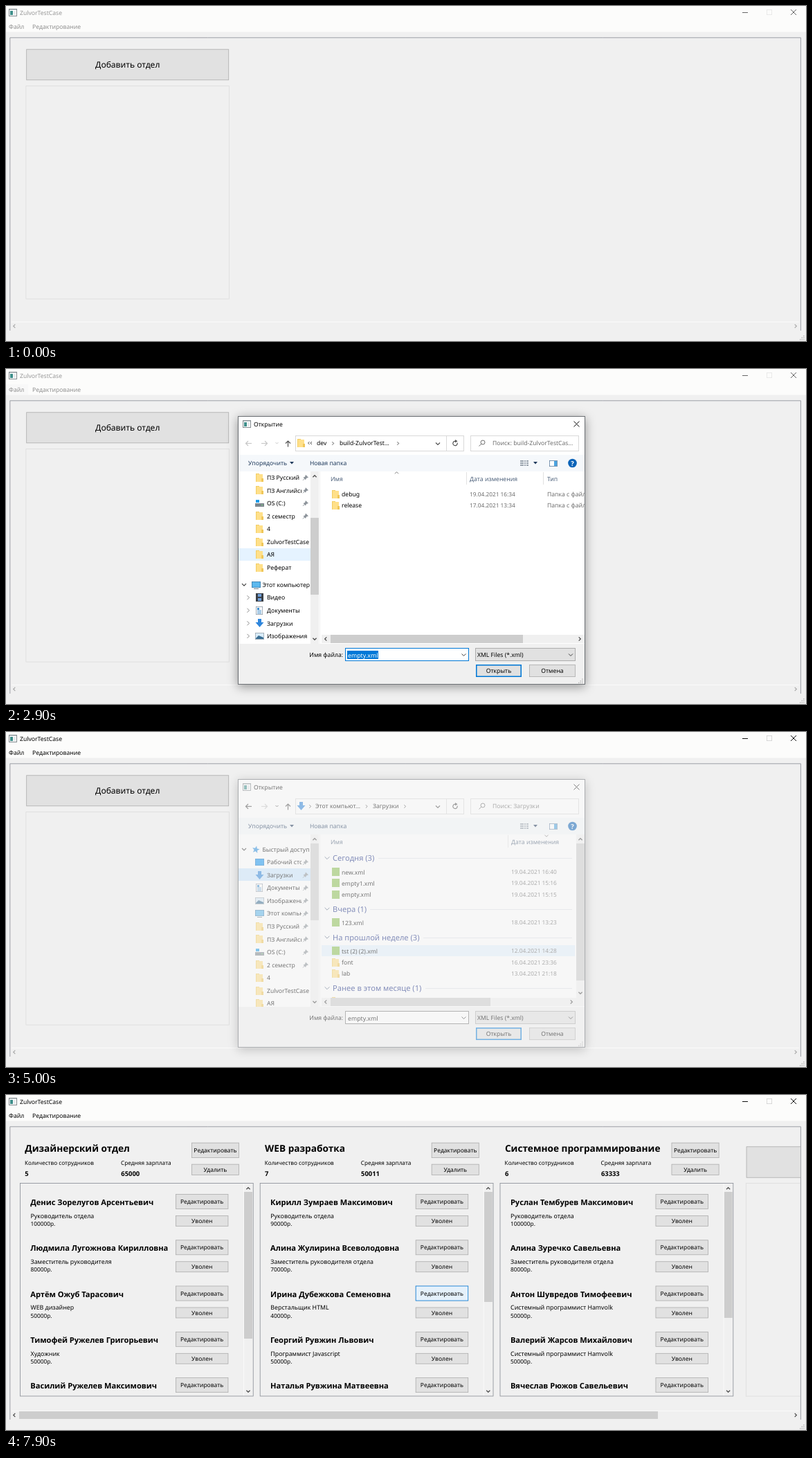
Recreate the animation shown at these times as an HTML page with a canvas. Size 1156 by 484 pixels, loop 8000 ms.

```html
<!DOCTYPE html>
<html lang="ru">
<head>
<meta charset="utf-8">
<title>ZulvorTestCase</title>
<style>
html, body { margin: 0; width: 100%; height: 100%; overflow: hidden; background: #f0f0f0; }
canvas { position: absolute; left: 0; top: 0; }
#dialog { transform-origin: 586px 262px; }
</style>
</head>
<body>
<canvas id="main" width="1156" height="484"></canvas>
<canvas id="dialog" width="1156" height="484"></canvas>
<script>
const LOOP = 8000, STEP = 100;
// The interface is shown scaled down: one of its pixels covers this much of the stage.
const PX = 1156 / 1500;
const BLUE = '#0078d7', HOVER = '#e5f3ff', SELECTED = '#cce8ff', FACE = '#f0f0f0', THUMB = '#cdcdcd';
const APP = 'ZulvorTestCase';
const dialogCanvas = document.getElementById('dialog');
const mainCtx = document.getElementById('main').getContext('2d');
const dialogCtx = dialogCanvas.getContext('2d');
let g = mainCtx, t = 0;

const during = (from, to) => t >= from && t < to;
const ramp = (start, steps) => Math.min(1, Math.max(0, ((t - start) / STEP + 1) / steps));

// ---- drawing helpers ----
function fill(x, y, w, h, color) {
  g.fillStyle = color;
  g.fillRect(x, y, w, h);
}
function box(x, y, w, h, face, edge, width = PX) {
  if (face) fill(x, y, w, h, face);
  g.strokeStyle = edge;
  g.lineWidth = width;
  g.strokeRect(x + width / 2, y + width / 2, w - width, h - width);
}
function line(points, color, width = 1) {
  g.strokeStyle = color;
  g.lineWidth = width;
  g.beginPath();
  points.forEach(([x, y]) => g.lineTo(x, y));
  g.stroke();
}
function shape(points, color) {
  g.fillStyle = color;
  g.beginPath();
  points.forEach(([x, y]) => g.lineTo(x, y));
  g.fill();
}
function text(str, x, y, size = 8.6, color = '#000', weight = 400, align = 'left') {
  g.font = `${weight} ${size}px "Noto Sans", "Open Sans", sans-serif`;
  g.textAlign = align;
  g.fillStyle = color;
  g.fillText(str, x, y);
}
function clipped(x, y, w, h, draw) {
  g.save();
  g.beginPath();
  g.rect(x, y, w, h);
  g.clip();
  draw();
  g.restore();
}
const RIGHT = 0, DOWN = 1, LEFT = 2, UP = 3;
function turned(x, y, dir, draw) {
  g.save();
  g.translate(x, y);
  g.rotate(dir * Math.PI / 2);
  draw();
  g.restore();
}
function chevron(x, y, dir, r = 2.6, color = '#505050', width = 1.3) {
  turned(x, y, dir, () => line([[-r / 2, -r], [r / 2, 0], [-r / 2, r]], color, width));
}
function arrow(x, y, dir, color) {
  turned(x, y, dir, () => {
    line([[-4.5, 0], [4, 0]], color, 1.2);
    line([[.5, -3.5], [4, 0], [.5, 3.5]], color, 1.2);
  });
}
function cross(x, y, color) {
  line([[x - 4, y - 4], [x + 4, y + 4]], color);
  line([[x + 4, y - 4], [x - 4, y + 4]], color);
}
function button(label, x, y, w, h, hover = 0, size = 8.45) {
  box(x, y, w, h, '#e1e1e1', '#adadad');
  g.globalAlpha = hover;
  box(x, y, w, h, '#e5f1fb', BLUE);
  g.globalAlpha = 1;
  text(label, x + w / 2, y + h / 2 + size * .36, size, '#000', 400, 'center');
}
function grip(x, y) {
  for (let r = 0; r < 3; r++)
    for (let c = 2 - r; c < 3; c++) fill(x + c * 2.6, y + r * 2.6, 1.4, 1.4, '#b4b4b4');
}
function vScroll(x, top, bottom, thumbY, thumbH) {
  fill(x, top, 12, bottom - top, FACE);
  fill(x, thumbY, 12, thumbH, THUMB);
  chevron(x + 6, top + 7, UP);
  chevron(x + 6, bottom - 7, DOWN);
}
function hScroll(left, right, y, thumbX, thumbW) {
  fill(left, y, right - left, 12, FACE);
  fill(thumbX, y, thumbW, 12, THUMB);
  chevron(left + 6, y + 6, LEFT);
  chevron(right - 7, y + 6, RIGHT);
}
function appIcon(x, y) {
  box(x, y, 12, 11, '#fff', '#858d91', 1);
  fill(x + 1, y + 1, 10, 1, '#c9d2d6');
  fill(x + 2, y + 3, 4, 6, '#3f8f8b');
  fill(x + 7, y + 3, 3, 6, '#e6eaec');
}

// Icons are about 12 px wide and centred on x, y.
const icons = {
  folder(x, y) {
    fill(x - 5, y - 6, 5, 12, '#f3cd63');
    fill(x - 4, y - 5, 9, 11, '#ffe08a');
    fill(x + 3, y + 1, 3, 5, '#f0c75a');
  },
  xml(x, y) { fill(x - 5, y - 6, 11, 12, '#8cc152'); },
  desktop(x, y) { box(x - 6, y - 5, 13, 10, '#1296f3', '#0b6fc2'); },
  download(x, y) {
    fill(x - 2, y - 6, 5, 6, '#2f86dc');
    shape([[x - 5.5, y - 1], [x + 6.5, y - 1], [x + .5, y + 6]], '#2f86dc');
  },
  document(x, y) {
    box(x - 5, y - 6, 10, 12, '#fff', '#8b97a3');
    fill(x - 3, y - 4, 3, 3, '#3f8fd0');
    for (let i = 0; i < 3; i++) fill(x - 3, y + i * 2 - .5, 6, 1, '#5b9bd0');
  },
  picture(x, y) {
    box(x - 6, y - 5, 13, 10, '#d9ecf9', '#9aa4ab');
    shape([[x - 5, y + 3], [x - 1, y - 1], [x + 6, y + 2], [x + 6, y + 4], [x - 5, y + 4]], '#3a6f94');
  },
  pc(x, y) {
    box(x - 6, y - 5, 13, 9, '#5cb8ee', '#3d7ba8');
    fill(x - 3, y + 5, 7, 1, '#6f7f8a');
  },
  drive(x, y) {
    fill(x - 5, y - 5, 5, 4, '#1c9be8');
    fill(x - 6, y, 13, 5, '#7d878e');
    fill(x + 3, y + 2, 2, 1, '#7fe07f');
  },
  star(x, y) {
    const points = Array.from({ length: 10 }, (_, i) => {
      const a = i * Math.PI / 5 - Math.PI / 2 + .2, r = i % 2 ? 2.4 : 5.6;
      return [x + r * Math.cos(a), y + r * Math.sin(a)];
    });
    shape(points, '#2b8fdf');
  },
  film(x, y) {
    fill(x - 5, y - 6, 11, 12, '#3a3f46');
    fill(x - 2, y - 5, 5, 4, '#6f9fd8');
    fill(x - 2, y + 1, 5, 4, '#6f9fd8');
  },
  music(x, y) {
    fill(x, y - 5, 1.5, 9, '#2f86dc');
    fill(x - 3, y + 2, 4, 3, '#2f86dc');
  }
};
function pin(x, y) {
  shape([[x, y - 4], [x + 4, y], [x + 1, y + 1], [x, y + 3.5], [x - 3.5, y], [x - 1, y - 1]], '#8c939a');
  line([[x - 1.5, y + 1.5], [x - 4, y + 4]], '#8c939a');
}

// ---- main window ----
const COLUMN = 450 * PX, ROW = 86 * PX;

function drawWindow() {
  const active = during(1200, 2100) || t >= 5000;
  const menuColor = during(1200, 2300) || t >= 5000 ? '#000' : '#8f8f8f';
  const buttonColor = active ? '#111' : '#666';
  fill(0, 0, 1156, 484, FACE);
  fill(0, 0, 1156, 37.4, '#fcfcfb');
  appIcon(4, 4);
  text(APP, 20, 13, 8.6, active ? '#000' : '#979797');
  line([[1064, 9.5], [1072, 9.5]], buttonColor);
  box(1099, 5, 8, 8, null, active ? '#cfcfcf' : '#e6e6e6');
  cross(1138, 9, buttonColor);

  if (during(800, 1200)) {
    g.globalAlpha = ramp(800, 2);
    box(0, 22, 32, 15, HOVER, SELECTED);
    g.globalAlpha = 1;
  } else if (during(1200, 2300)) box(0, 22, 32, 15, SELECTED, '#99d1ff');
  else if (during(2300, 5000)) fill(0, 22, 32, 15, '#f8f8f8');
  text('Файл', 4, 33, 8.6, menuColor);
  text('Редактирование', 38, 33, 8.6, menuColor);

  line([[5.8, 469], [5.8, 45.8], [1148.4, 45.8], [1148.4, 469]], '#828790', PX);
  const loaded = t >= 5100;
  fill(8, 456, 1138, 1, '#fafafa');
  if (loaded) fill(19, 457, 923, 11, THUMB);
  const arrowColor = loaded ? '#505050' : '#adadad';
  chevron(12, 462.5, LEFT, 2.6, arrowColor);
  chevron(1141, 462.5, RIGHT, 2.6, arrowColor);
  grip(1147, 476);
  if (loaded) clipped(6, 46, 1142, 410, drawDepartments);
  else {
    button('Добавить отдел', 29.3, 62.4, 292.8, 44.8, ramp(400, 3) - ramp(800, 3), 12);
    box(28.5, 115.2, 294.4, 308.3, null, '#dcdcdc');
  }
  if (during(1200, 2100)) drawMenu();
}

function drawMenu() {
  g.save();
  g.globalAlpha = ramp(1200, 3);
  g.shadowColor = 'rgba(0,0,0,.3)';
  g.shadowBlur = 4;
  g.shadowOffsetX = g.shadowOffsetY = 2;
  fill(0, 38, 95, 54, '#f2f2f2');
  g.shadowColor = 'transparent';
  box(0, 38, 95, 54, null, '#bdbdbd');
  if (t >= 1500) fill(2, t < 1800 ? 39 : 56, 91, 17, '#90c8f6');
  ['Создать', 'Открыть', 'Сохранить'].forEach((label, i) => text(label, 24, 51 + i * 17));
  g.restore();
}

const HEAD = 'Руководитель отдела', DEPUTY = 'Заместитель руководителя';
const SYSTEM = 'Системный программист Hamvolk';
const departments = [
  { title: 'Дизайнерский отдел', count: 5, mean: 65000, thumb: 212, staff: [
    ['Денис Зорелугов Арсентьевич', HEAD, 100000],
    ['Людмила Лугожнова Кирилловна', DEPUTY, 80000],
    ['Артём Ожуб Тарасович', 'WEB дизайнер', 50000],
    ['Тимофей Ружелев Григорьевич', 'Художник', 50000],
    ['Василий Ружелев Максимович']] },
  { title: 'WEB разработка', count: 7, mean: 50011, thumb: 159, staff: [
    ['Кирилл Зумраев Максимович', HEAD, 90000],
    ['Алина Жулирина Всеволодовна', DEPUTY + ' отдела', 70000],
    ['Ирина Дубежкова Семеновна', 'Верстальщик HTML', 40000],
    ['Георгий Рувжин Львович', 'Программист Javascript', 50000],
    ['Наталья Рувжина Матвеевна']] },
  { title: 'Системное программирование', count: 6, mean: 63333, thumb: 182, staff: [
    ['Руслан Тембурев Максимович', HEAD, 100000],
    ['Алина Зуречко Савельевна', DEPUTY + ' отдела', 80000],
    ['Антон Шувредов Тимофеевич', SYSTEM, 50000],
    ['Валерий Жарсов Михайлович', SYSTEM, 50000],
    ['Вячеслав Рюжов Савельевич']] }
];
function editHover(col, row) {
  if (col === 0 && row === 0) return ramp(6500, 2) - ramp(7300, 2);
  return col === 1 && row === 2 ? ramp(7800, 2) : 0;
}
function drawDepartments() {
  departments.forEach(({ title, count, mean, thumb, staff }, col) => {
    const x = col * COLUMN;
    text(title, x + 27.3, 82, 13.65, '#000', 700);
    text('Количество сотрудников', x + 27, 101, 8.2);
    text('Средняя зарплата', x + 166, 101, 8.2);
    text(count, x + 27.3, 116.8, 9.4, '#000', 700);
    text(mean, x + 166.3, 116.8, 9.4, '#000', 700);
    button('Редактировать', x + 268, 68.8, 68.9, 22.2);
    button('Удалить', x + 268, 99.8, 68.9, 16);
    clipped(x + 20.5, 127.5, 336.5, 307.5, () => {
      staff.forEach(([name, role, pay], row) => {
        const y = row * ROW;
        text(name, x + 35.3, y + 159, 11.1, '#000', 700);
        button('Редактировать', x + 245, y + 143.1, 76.3, 21.8, editHover(col, row));
        if (!role) return;
        text(role, x + 35.5, y + 177.7, 8.8);
        text(pay + 'р.', x + 35.5, y + 189, 8.3);
        button('Уволен', x + 245, y + 174.1, 76.3, 15.7);
      });
      vScroll(x + 344, 128, 435, 140, thumb);
      fill(x + 343, 128, 1, 307, '#fafafa');
    });
    box(x + 20, 127.1, 337.6, 308.3, null, '#828790');
  });
  const nextX = 3 * COLUMN;
  box(nextX + 29.3, 74.4, 292.8, 45.2, '#e1e1e1', '#adadad');
  box(nextX + 28.5, 127.2, 294.4, 308.3, null, '#dcdcdc');
}

// ---- file dialog ----
const places = [
  ['star', 'Быстрый доступ'], ['desktop', 'Рабочий стол'], ['download', 'Загрузки'],
  ['document', 'Документы'], ['picture', 'Изображения'], ['pc', 'Этот компьютер'],
  ['folder', 'ПЗ Русский'], ['folder', 'ПЗ Английский'], ['drive', 'OS (C:)'],
  ['folder', '2 семестр'], ['folder', '4'], ['folder', APP], ['folder', 'АЯ'], ['folder', 'Реферат'],
  ['pc', 'Этот компьютер'], ['film', 'Видео'], ['document', 'Документы'], ['download', 'Загрузки'],
  ['picture', 'Изображения'], ['music', 'Музыка'], ['folder', 'Объемные объекты'],
  ['desktop', 'Рабочий стол'], ['drive', 'OS (C:)']
];
const COMPUTER = 14, DOWNLOADS = 2;
function drawPlaces() {
  const scroll = 217 * (1 - ramp(2700, 7));
  fill(336, 148, 104, 249, '#fff');
  places.forEach(([icon, label], i) => {
    const y = 169.5 + i * 18.55 + (i >= COMPUTER ? 6.5 : 0) - scroll;
    if (y < 135 || y > 410) return;
    const root = i === 0 || i === COMPUTER, pinned = i > 0 && i < 10;
    if (t < 3600 ? Math.abs(y - 268) < 9.27 : i === DOWNLOADS) {
      g.globalAlpha = t < 3600 ? 1 : ramp(3600, 2);
      fill(336, Math.round(y - 9.3), 104, 18, t < 3900 ? HOVER : SELECTED);
      g.globalAlpha = 1;
    }
    if (root) chevron(344, y, DOWN, 3, '#404040', 1.2);
    else if (i > COMPUTER) chevron(350, y, RIGHT, 3, '#8a8a8a', 1);
    icons[icon](root ? 361 : 366, Math.round(y));
    clipped(336, 148, pinned ? 91 : 103, 249, () => text(label, root ? 370.5 : 377, y + 3.2));
    if (pinned) pin(433, y);
  });
  vScroll(440, 148, 397, 161 + scroll * .436, 111);
}

function header(label, x, divider) {
  text(label, x, 162, 8.6, '#4c607a');
  if (divider) fill(divider, 149, 1, 18, '#e2e2e2');
}
function file(icon, name, y, date, dateX) {
  icons[icon](476, Math.round(y));
  text(name, 485, y + 3.5);
  text(date, dateX, y + 3.3, 8.3, '#6d6d6d');
}
function drawBuildFolder() {
  header('Имя', 469, 665);
  header('Дата изменения', 670, 776);
  header('Тип', 782);
  chevron(564.5, 150, UP, 2.6, '#808080', 1);
  [['debug', 180.5, '19.04.2021 16:34'], ['release', 196.7, '17.04.2021 13:34']].forEach(([name, y, date]) => {
    file('folder', name, y, date, 670);
    text('Папка с файлами', 782, y + 3.3, 8.6, '#6d6d6d');
  });
  hScroll(456, 836, 384, 469, 278);
}
const groups = [['Сегодня (3)', 182, 538], ['Вчера (1)', 255.5, 526],
  ['На прошлой неделе (3)', 296.5, 603], ['Ранее в этом месяце (1)', 370, 606]];
const downloads = [['new.xml', 202, '19.04.2021 16:40'], ['empty1.xml', 218, '19.04.2021 15:16'],
  ['empty.xml', 234.5, '19.04.2021 15:15'], ['123.xml', 275, '18.04.2021 13:23'],
  ['tst (2) (2).xml', 316, '12.04.2021 14:28'], ['font', 332.5, '16.04.2021 23:36'],
  ['lab', 348.7, '13.04.2021 21:18'], ['', 389, '']];
function drawDownloads() {
  header('Имя', 469, 725);
  header('Дата изменения', 730);
  chevron(781, 150, DOWN, 2.6, '#808080', 1);
  if (during(4200, 4400)) fill(456, 210, 366, 16, HOVER);
  else if (during(4400, 4700)) {
    fill(456, 210, 366, 16, '#f8f8f8');
    fill(456, 286, 366, 21, HOVER);
  } else if (t >= 4700) fill(456, 308, 366, 16, HOVER);
  groups.forEach(([label, y, lineX]) => {
    chevron(464, y, DOWN, 3.4, '#5a6a85', 1);
    text(label, 472, y + 4, 11.1, '#1e3287');
    fill(lineX, Math.round(y), 818 - lineX, 1, '#dfe3ea');
  });
  downloads.forEach(([name, y, date]) => file(name.endsWith('.xml') ? 'xml' : 'folder', name, y, date, 730));
  vScroll(824, 148, 384, 161, 198);
  hScroll(456, 824, 384, 469, 231);
  fill(824, 384, 12, 13, FACE);
}

function drawAddressBar(opened) {
  arrow(350.5, 107.5, LEFT, opened ? '#505050' : '#c8c8c8');
  arrow(373.5, 107.5, RIGHT, '#c8c8c8');
  chevron(391.5, 107, DOWN, 2, opened ? '#606060' : '#c8c8c8', 1);
  arrow(407.5, 108, UP, '#505050');
  box(418, 96, 244, 23, '#fff', '#d9d9d9', 1);
  fill(636, 97, 1, 21, '#d9d9d9');
  chevron(624, 108, DOWN, 3, '#505050', 1.2);
  g.strokeStyle = '#505050';
  g.lineWidth = 1.2;
  g.beginPath();
  g.arc(649, 107.5, 3.2, -.3, 4.9);
  g.stroke();
  shape([[649, 102], [652.5, 104.2], [649, 106.4]], '#505050');
  const crumb = x => chevron(x, 107.5, RIGHT, 2.2, '#505050', 1);
  if (opened) {
    icons.download(426, 107);
    [439.5, 521, 576.5].forEach(crumb);
    text('Этот компьют...', 447, 110);
    text('Загрузки', 530, 110);
  } else {
    icons.folder(426, 107);
    chevron(437.5, 107, LEFT, 2, '#505050', 1);
    chevron(441, 107, LEFT, 2, '#505050', 1);
    [472.5, 566.5].forEach(crumb);
    text('dev', 449, 110);
    text('build-ZulvorTest...', 482, 110);
  }
  box(671, 96, 157, 23, '#fff', '#d9d9d9', 1);
  g.strokeStyle = '#707070';
  g.lineWidth = 1;
  g.beginPath();
  g.arc(689, 106, 3, 0, 7);
  g.stroke();
  line([[686.8, 108.2], [683.5, 111.5]], '#707070');
  text(opened ? 'Поиск: Загрузки' : 'Поиск: build-ZulvorTestCas...', 703, 110, 8.6, '#6d6d6d');
}
function drawToolbar() {
  fill(336, 124, 500, 24, '#f5f8fb');
  text('Упорядочить', 350, 139, 8.6, '#1e395b');
  text('Новая папка', 439, 139, 8.6, '#1e395b');
  for (const x of [413, 765]) shape([[x - 3, 134], [x + 3, 134], [x, 137.5]], '#1e395b');
  for (let i = 0; i < 3; i++) {
    fill(743, 132 + i * 3, 5, 2, '#9aa3ad');
    fill(749, 132 + i * 3, 2, 2, '#9aa3ad');
    fill(752, 132 + i * 3, 3, 2, '#9aa3ad');
  }
  box(785, 132, 12, 9, '#fff', '#56789a');
  fill(792, 133, 4, 7, '#4aa3e0');
  g.fillStyle = '#0a63b8';
  g.beginPath();
  g.arc(818.5, 136, 6.3, 0, 7);
  g.fill();
  text('?', 818.5, 139.5, 9.5, '#fff', 700, 'center');
}
function drawDialogFooter() {
  fill(336, 397, 500, 58, FACE);
  const focused = t < 3900;
  text('Имя файла:', 487, 416, 8.6, '#000', 400, 'right');
  box(490, 403, 179, 19, '#fff', focused ? BLUE : '#7a7a7a', 1);
  if (focused) fill(493, 407, 45, 12, BLUE);
  text('empty.xml', 494, 416.5, 8.8, focused ? '#fff' : '#000');
  chevron(661.5, 413, DOWN, 3, '#404040', 1);
  box(678, 403, 145, 19, '#e1e1e1', '#adadad', 1);
  text('XML Files (*.xml)', 681, 416);
  chevron(816, 413, DOWN, 3, '#404040', 1);
  button('Открыть', 679, 427, 66, 18, 0, 8.6);
  box(679, 427, 66, 18, null, BLUE, 2 * PX);
  button('Отмена', 756, 427, 67, 18, 0, 8.6);
  grip(827, 447.5);
}
function drawDialog() {
  const opened = t >= 4000;
  g.clearRect(0, 0, 1156, 484);
  g.save();
  g.shadowColor = 'rgba(0,0,0,.4)';
  g.shadowBlur = 14;
  g.shadowOffsetY = 3;
  fill(335, 68, 502, 388, '#fff');
  g.restore();
  appIcon(342, 74);
  text('Открытие', 358, 83);
  cross(824.5, 79.5, '#111');
  drawAddressBar(opened);
  drawToolbar();
  clipped(336, 148, 116, 249, drawPlaces);
  fill(453, 148, 1, 249, FACE);
  clipped(454, 148, 382, 249, () => {
    (opened ? drawDownloads : drawBuildFolder)();
    fill(454, 396, 382, 1, '#fff');
  });
  drawDialogFooter();
  box(335, 68, 502, 388, null, '#6b6f73', 1);
}

function frame(now) {
  t = Math.floor(now % LOOP / STEP) * STEP;
  g = mainCtx;
  drawWindow();
  const visible = during(2300, 5200);
  dialogCanvas.style.opacity = !visible ? 0 : t < 5000 ? ramp(2300, 3) : t < 5100 ? .5 : .12;
  dialogCanvas.style.transform = during(2300, 2500) ? `scale(${.9 + .1 * ramp(2300, 3)})` : 'none';
  if (visible) {
    g = dialogCtx;
    drawDialog();
  }
}
const start = performance.now();
function tick(now) {
  frame(Math.max(0, now - start));
  requestAnimationFrame(tick);
}
for (const ctx of [mainCtx, dialogCtx]) ctx.textRendering = 'geometricPrecision';
requestAnimationFrame(tick);
</script>
</body>
</html>
```
